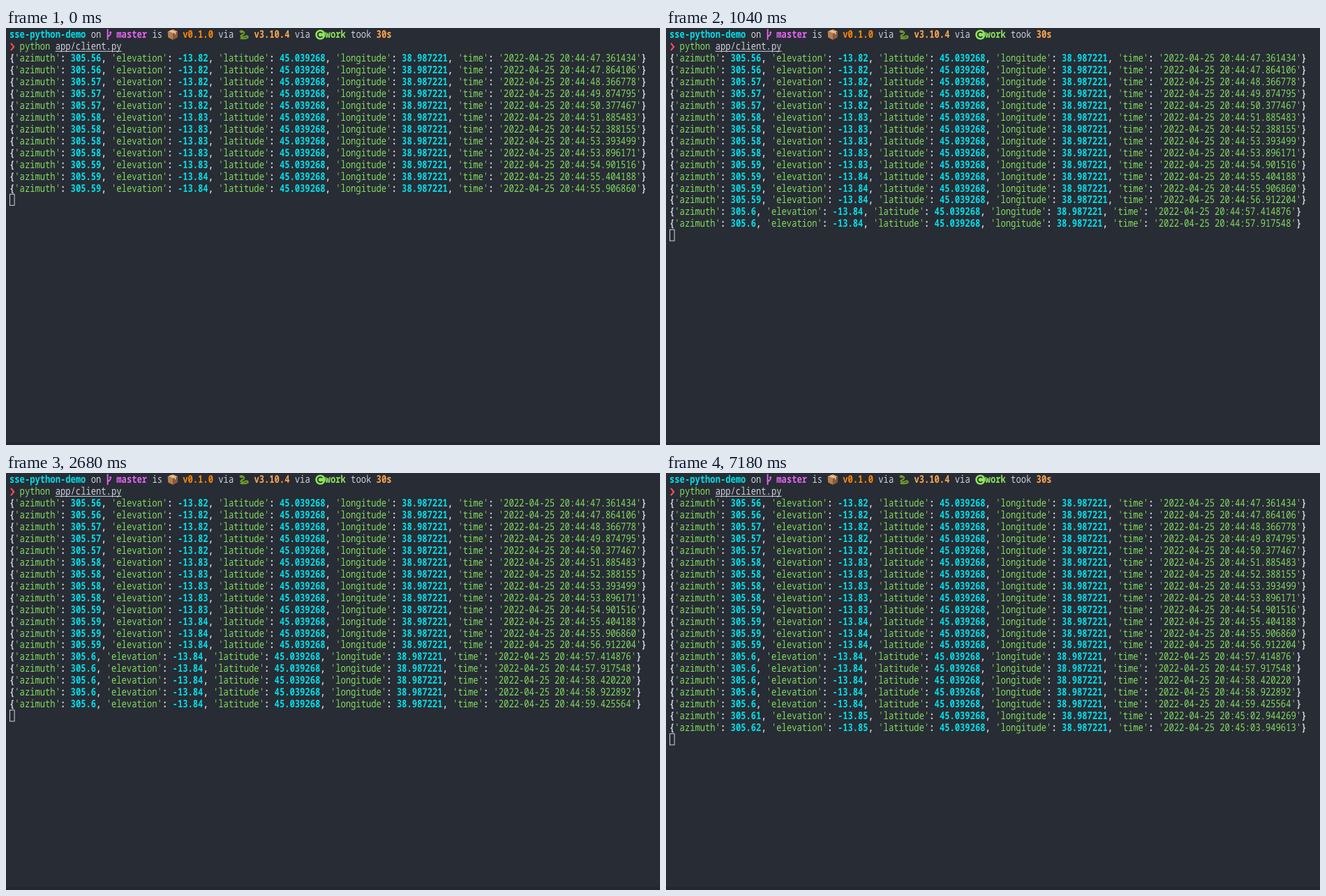
These frames come from a looping animation (937 px wide and 598 px high, 8 s). An HTML page:

```html
<!DOCTYPE html>
<html lang="en">
<head>
<meta charset="utf-8">
<title>Terminal stream</title>
<style>
  html, body { margin: 0; width: 100%; height: 100%; overflow: hidden; background: #282c34; }
  svg { display: block; width: 100%; height: 100%; }
  text {
    font: 500 12.1667px "Noto Sans Mono", "DejaVu Sans Mono", monospace;
    white-space: pre;
    text-rendering: geometricPrecision;
    font-variant-ligatures: none;
  }
  .b { font-weight: 600; }
</style>
</head>
<body>
<svg viewBox="0 0 937 598">
  <rect width="937" height="598" fill="#282c34"/>
  <rect y="594" width="937" height="4" fill="#23272f"/>
  <g id="screen"></g>

  <!-- branch -->
  <g fill="none" stroke="#e863f7" stroke-width="1.8">
    <path d="M145.6 1.5V17M149.7 5.5V8.2Q149.7 10 147.8 10.9L145.6 12.4"/>
    <path d="M147.7 7L149.7 4.6L151.7 7Z" fill="#e863f7" stroke="none"/>
  </g>

  <!-- package -->
  <g>
    <path d="M231.6 5L239 2L246.2 5L239.2 8.2Z" fill="#d9a775"/>
    <path d="M231.6 5L239.2 8.2V17L232.2 13.6Z" fill="#b67d50"/>
    <path d="M246.2 5L239.2 8.2V17L245.8 13.6Z" fill="#8f5b39"/>
    <path d="M234.4 3.9L242 7V9.6L243.3 9V6.3L236 3.2Z" fill="#ecd5b5"/>
  </g>

  <!-- snake -->
  <g fill="none" stroke-linecap="round" stroke-linejoin="round">
    <path d="M337 5.2Q341.5 4.6 341.2 7.2Q340.8 9 337.8 10.2Q335 12 338 12.8Q342 13.2 344 11.4Q347.4 11.2 346.3 13.8Q343 16 336.5 14.8" stroke="#6f9a2b" stroke-width="2.2"/>
    <ellipse cx="337.2" cy="5" rx="2.6" ry="1.9" fill="#7fa932"/>
    <circle cx="337" cy="4.6" r="0.6" fill="#22262d"/>
  </g>

  <!-- environment badge -->
  <circle cx="450.4" cy="9.6" r="7.2" fill="#8ee55a"/>
  <path d="M453.2 7.2A3.7 3.7 0 1 0 453.2 12" fill="none" stroke="#282c34" stroke-width="1.8"/>

  <path d="M7 21.8L11.2 27L7 32.2" fill="none" stroke="#ff4f58" stroke-width="2.1"/>
  <path d="M70.7 33.4H165.6" stroke="#ccd2dc"/>
  <rect id="cursor" x="5.5" width="6.6" height="16" fill="none" stroke="#ccd2dc"/>
</svg>
<script>
const LOOP = 8000, CELL = 7.3, LEFT = 5, PITCH = 16.94, BASE = 14.3, TALL = 1.23;
const GRAY = '#ccd2dc', CYAN = '#00dde8', GREEN = '#82dc60', LIME = '#8ee55a',
      PINK = '#e863f7', ORANGE = '#ff8700', AMBER = '#ffa550';
const START_ROWS = 12, FIRST_ROW = 2;
const ARRIVALS = [150, 590, 1040, 1640, 2090, 2680, 6130, 7180];

// The server polls about twice a second; each digit is the polls between two readings
const POLL = 0.5026721, FIRST_SECOND = 47.361434, GAPS = '01131312121121111172';

const screen = document.getElementById('screen');
const cursor = document.getElementById('cursor');

function add(parent, name, attrs) {
  const node = document.createElementNS('http://www.w3.org/2000/svg', name);
  for (const key in attrs) node.setAttribute(key, attrs[key]);
  return parent.appendChild(node);
}

// A row of the character grid, with tall narrow letters
function addRow(row) {
  const y = BASE + row * PITCH;
  return add(screen, 'g', { transform: `translate(${LEFT} ${y}) scale(1 ${TALL})` });
}

function write(row, col, string, fill, bold) {
  const node = add(row, 'text', { x: col * CELL, fill });
  if (bold) node.setAttribute('class', 'b');
  node.textContent = string;
}

const round2 = n => Math.round(n * 100) / 100;

function clock(second) {
  const minute = 44 + Math.floor(second / 60);
  return `20:${minute}:${(second % 60).toFixed(6).padStart(9, '0')}`;
}

// The sun drifts steadily west and down
function reading(second) {
  const azimuth = round2(305.565 + (second - 48.1) / 305);
  const elevation = round2(-13.835 - (second - 55.1) / 450);
  return `{'azimuth': ${azimuth}, 'elevation': ${elevation}, 'latitude': 45.039268, ` +
    `'longitude': 38.987221, 'time': '2022-04-25 ${clock(second)}'}`;
}

function addReading(second, index) {
  const row = addRow(FIRST_ROW + index);
  for (const { 0: token, index: col } of reading(second).matchAll(/'[^']*'|-?\d+\.\d+|[{}:,]/g)) {
    if (token[0] === "'") write(row, col, token, GREEN);
    else if (/\d/.test(token)) write(row, col, token, CYAN, true);
    else write(row, col, token, GRAY, true);
  }
  return row;
}

const prompt = addRow(0);
write(prompt, 0, 'sse-python-demo', CYAN, true);
write(prompt, 16, 'on', GRAY);
write(prompt, 21, 'master', PINK, true);
write(prompt, 28, 'is', GRAY);
write(prompt, 34, 'v0.1.0', ORANGE, true);
write(prompt, 41, 'via', GRAY);
write(prompt, 48, 'v3.10.4', AMBER, true);
write(prompt, 56, 'via', GRAY);
write(prompt, 62, 'work', LIME, true);
write(prompt, 67, 'took', GRAY);
write(prompt, 72, '30s', AMBER, true);

const command = addRow(1);
write(command, 2, 'python', GREEN);
write(command, 9, 'app/client.py', GRAY);

let polls = 0;
const rows = [...GAPS].map((gap, i) => {
  polls += +gap;
  return addReading(FIRST_SECOND + polls * POLL, i);
});

function render(t) {
  const count = START_ROWS + ARRIVALS.filter(at => at <= t).length;
  rows.forEach((row, i) => row.setAttribute('visibility', i < count ? 'visible' : 'hidden'));
  cursor.setAttribute('y', (FIRST_ROW + count) * PITCH + 1.2);
}

let start;
function tick(now) {
  start ??= now;
  render((now - start) % LOOP);
  requestAnimationFrame(tick);
}
render(0);
requestAnimationFrame(tick);
</script>
</body>
</html>
```
